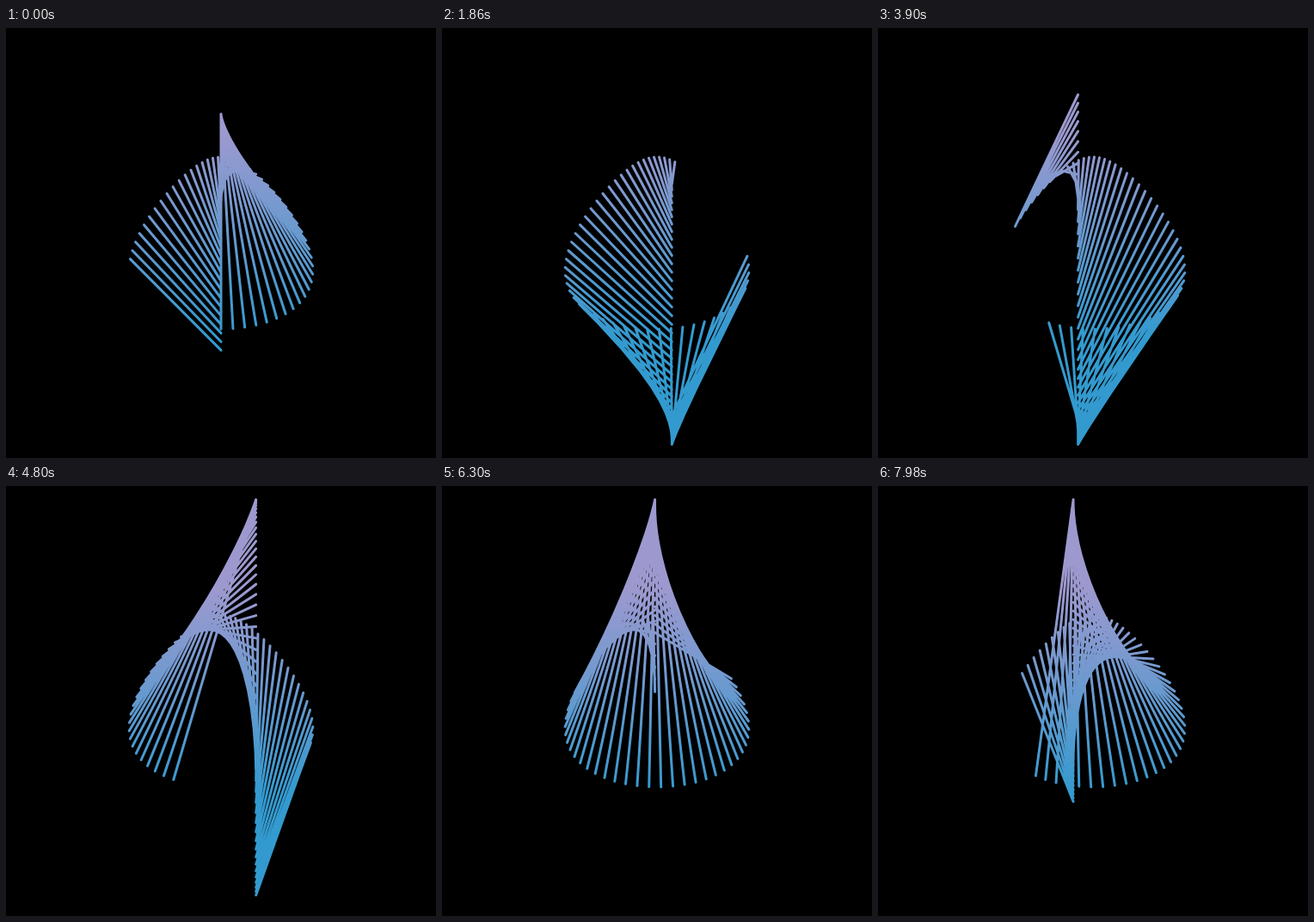
These frames come from a looping animation (500x500 px, 8 s). An HTML page:

```html
<!DOCTYPE html>
<html lang="en">
<head>
<meta charset="utf-8">
<title>Parametric lines</title>
<style>
  html, body { margin: 0; width: 100%; height: 100%; overflow: hidden; background: #000; }
  svg { display: block; width: 100%; height: 100%; }
</style>
</head>
<body>
<svg viewBox="0 0 500 500">
  <defs>
    <linearGradient id="ink" gradientUnits="userSpaceOnUse" x1="0" y1="-130" x2="0" y2="110">
      <stop offset="0" stop-color="#9d99cf"/>
      <stop offset="1" stop-color="#339acf"/>
    </linearGradient>
  </defs>
  <rect width="500" height="500" fill="#000"/>
  <path id="lines" transform="translate(250 250)" fill="none" stroke="url(#ink)"
        stroke-width="3" stroke-linecap="round"/>
</svg>
<script>
  const LOOP = 8000, STEP = 30, COUNT = 50;
  const TICKS = 0.905, ADVANCE = 0.5; // ticks per step, phase per tick
  const { sin, cos, floor, round } = Math;
  const lines = document.getElementById('lines');

  // One end runs round a skewed oval.
  const x1 = t => 100 * sin(t / 10) + 20 * sin(t / 5);
  const y1 = t => 100 * cos(t / 10);
  // The other end bobs along a vertical that sways as a whole.
  const x2 = t => 50 * sin(t / 10) + 2 * sin(t);
  const y2 = t => 50 * cos(t / 12) - 200 * cos(t / 20);

  function draw(ms) {
    const t = round(floor(ms / STEP) * TICKS) * ADVANCE;
    const x = x2(t).toFixed(2);
    let d = '';
    for (let i = 0; i < COUNT; i++) {
      const p = t + i;
      d += `M${x1(p).toFixed(2)} ${y1(p).toFixed(2)}L${x} ${y2(p).toFixed(2)}`;
    }
    lines.setAttribute('d', d);
  }

  const start = performance.now();
  function tick() {
    draw((performance.now() - start) % LOOP);
    requestAnimationFrame(tick);
  }
  tick();
</script>
</body>
</html>
```
